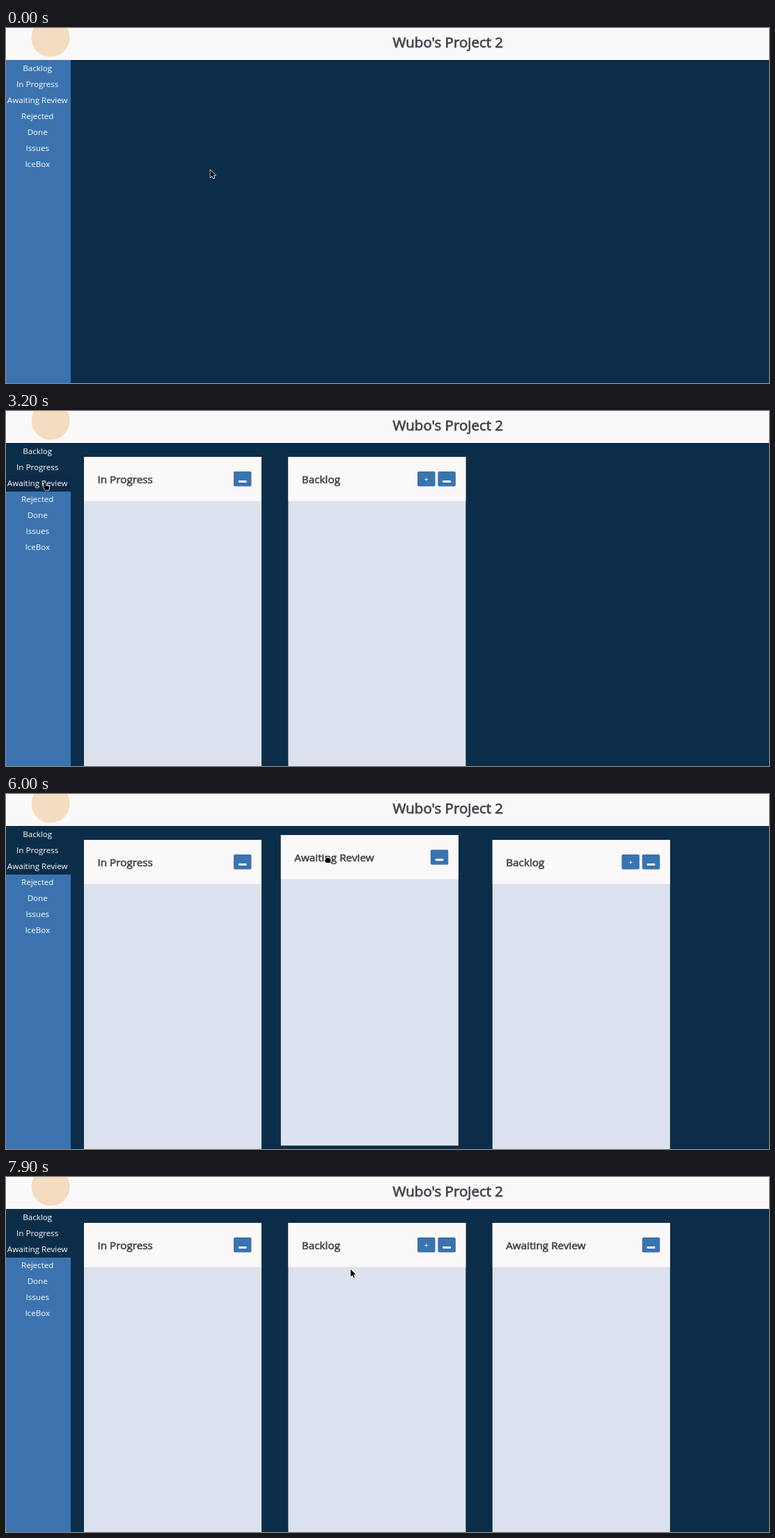
Write an HTML page that moves like this. It is 1096x511 px and loops after 8 s.

```html
<!DOCTYPE html>
<html lang="en">
<head>
<meta charset="utf-8">
<title>Project board</title>
<style>
  html, body { margin: 0; width: 100%; height: 100%; overflow: hidden; background: #0c2d4a; }
  svg { display: block; width: 100%; height: 100%; }
  text { font-family: "Open Sans", "Noto Sans", sans-serif; }
  .menu { font-size: 11.6px; fill: #fff; text-anchor: middle; }
  .title { font-size: 15.3px; fill: #3f444a; stroke: #3f444a; stroke-width: .6px; }
  .heading { font-size: 20.5px; fill: #43484e; stroke: #43484e; stroke-width: .8px; text-anchor: end; }
  .plus { font-size: 11.5px; fill: #fff; text-anchor: middle; }
</style>
</head>
<body>
<svg id="stage" viewBox="0 0 1096 511"></svg>
<script>
const LOOP = 8000, STEP = 100;
const BLUE = '#3b73af', NAVY = '#0c2d4a', HOVER = '#0c2845', PAPER = '#faf8f9';
const MENU = ['Backlog', 'In Progress', 'Awaiting Review', 'Rejected', 'Done', 'Issues', 'IceBox'];
const SIDE_TOP = 46, SIDE_WIDTH = 93, ROW_HEIGHT = 23;
const PANEL_TOP = 66, slotX = slot => 112 + 293.4 * slot;

// The dragged panel trails the pointer by this many ms.
const LAG = 40;
const DRAGS = [
  { name: 'Awaiting Review', start: 5115, end: 6100, from: slotX(0), to: 396, power: 3,
    grab: [62, 30], sway: e => 9.2 * Math.sin(4 * e) },
  { name: 'Backlog', start: 6900, end: 7900, from: slotX(2), to: 396, power: 1.7,
    grab: [51, 32], sway: e => -13 * Math.sin(Math.PI * e) ** 2 }
];
const MOVES = [
  { start: 0, end: 1000, to: [52, 54] },
  { start: 1700, end: 2400, to: [54, 80] },
  { start: 2700, end: 3200, to: [54, 103] },
  { start: 4000, end: 4800, to: [164, 94] },
  { start: 5100, end: 6000, to: [457, 88] },
  { start: 6000, end: 6400, to: [797, 96] },
  { start: 6400, end: 6700, to: [749, 98] },
  { start: 7800, end: 7900, to: [495, 133] }
];
const ORDERS = [
  [0, []],
  [1600, ['Backlog']],
  [2600, ['In Progress', 'Backlog']],
  [3800, ['Awaiting Review', 'In Progress', 'Backlog']],
  [5800, ['In Progress', 'Awaiting Review', 'Backlog']],
  [7300, ['In Progress', 'Backlog', 'Awaiting Review']]
];
const CURSORS = {
  arrow: 'M0 0V10.5L2.4 8.3L4.2 12L6 11.2L4.3 7.6H7.6Z',
  hand: 'M1.6 0Q2.8 0 2.8 1.2V4.2L7 5Q8.4 5.3 8.2 6.8L7.5 11H2.6L0 7.2Q-.6 6 .5 6V1.2Q.5 0 1.6 0Z',
  fist: 'M1 4Q4.5 1.5 7.2 4Q8.6 3.8 8.6 5.2V7.4L7.7 10H2.3L0 7.2Q-.4 6 1 6Z'
};

const stage = document.getElementById('stage');

function make(tag, attrs, parent = stage, text = '') {
  const el = document.createElementNS('http://www.w3.org/2000/svg', tag);
  for (const key in attrs) el.setAttribute(key, attrs[key]);
  el.textContent = text;
  return parent.appendChild(el);
}

const rect = (x, y, width, height, fill, parent, rx = 0) =>
  make('rect', { x, y, width, height, fill, rx }, parent);

const moveTo = (el, x, y) => el.setAttribute('transform', `translate(${x} ${y})`);

const mix = (a, b, k) => a + (b - a) * k;
const progress = ({ start, end }, t) => Math.min(1, Math.max(0, (t - start) / (end - start)));
const easeOut = p => 1 - (1 - p) ** 1.5;
const easeInOut = (p, power) =>
  p < .5 ? (2 * p) ** power / 2 : 1 - (2 - 2 * p) ** power / 2;

function dragPosition(drag, t) {
  const e = easeInOut(progress(drag, t), drag.power);
  return [mix(drag.from, drag.to, e), PANEL_TOP + drag.sway(e)];
}

function pointerPosition(drag, t) {
  if (drag) return dragPosition(drag, t + LAG).map((v, i) => v + drag.grab[i]);
  let at = [293.5, 204.5];
  for (const move of MOVES) {
    const e = easeOut(progress(move, t));
    at = at.map((v, i) => mix(v, move.to[i], e));
  }
  return at;
}

function makePanel(name) {
  const panel = make('g', {}, board);
  rect(0, 0, 255, 447, '#dbe2ed', panel);
  rect(0, 0, 255, 63.6, PAPER, panel);
  make('text', { x: 19.4, y: 37.8, class: 'title' }, panel, name);
  if (name === 'Backlog') {
    rect(185.6, 21, 25.5, 21.5, BLUE, panel, 2);
    make('text', { x: 198.4, y: 35.8, class: 'plus' }, panel, '+');
  }
  rect(215, 21, 25.5, 21.5, BLUE, panel, 2);
  rect(222, 34, 11.5, 3, '#fff', panel, .6);
  return panel;
}

rect(0, 0, 1096, 511, NAVY);
rect(0, 0, 1096, SIDE_TOP, PAPER);
make('circle', { cx: 64, cy: 14, r: 27.5, fill: '#f3dcc0' });
make('text', { x: 714, y: 28.3, class: 'heading' }, stage, "Wubo's Project 2");
rect(0, SIDE_TOP, SIDE_WIDTH, 465, BLUE);
const rows = MENU.map((label, i) => {
  const top = SIDE_TOP + i * ROW_HEIGHT;
  const row = rect(0, top, SIDE_WIDTH, ROW_HEIGHT + 1, NAVY);
  make('text', { x: 45.2, y: top + 16.3, class: 'menu' }, stage, label);
  return row;
});
const board = make('g', {});
const panels = {};
for (const name of MENU.slice(0, 3)) panels[name] = makePanel(name);
const cursor = make('path', {
  fill: '#000', stroke: '#fff', 'stroke-width': 1.4, 'stroke-linejoin': 'round', 'paint-order': 'stroke'
});

function draw(time) {
  const t = Math.floor(time % LOOP / STEP) * STEP;
  const order = ORDERS.filter(entry => entry[0] <= t).pop()[1];
  const drag = DRAGS.find(d => t > d.start && t < d.end);
  const [x, y] = pointerPosition(drag, t);
  const hovered = x < SIDE_WIDTH ? Math.floor((y - SIDE_TOP) / ROW_HEIGHT) : -1;

  rows.forEach((row, i) => {
    const shown = order.includes(MENU[i]);
    row.setAttribute('visibility', shown || i === hovered ? 'visible' : 'hidden');
    row.setAttribute('fill', shown ? NAVY : HOVER);
  });
  for (const name in panels) {
    const slot = order.indexOf(name);
    panels[name].setAttribute('visibility', slot < 0 ? 'hidden' : 'visible');
    moveTo(panels[name], slotX(slot), PANEL_TOP);
  }
  if (drag) {
    const panel = panels[drag.name];
    moveTo(panel, ...dragPosition(drag, t));
    if (board.lastChild !== panel) board.appendChild(panel);
  }
  cursor.setAttribute('d', CURSORS[drag ? 'fist' : hovered >= 0 ? 'hand' : 'arrow']);
  moveTo(cursor, x, y);
}

const began = performance.now();
function tick() {
  draw(performance.now() - began);
  requestAnimationFrame(tick);
}
tick();
</script>
</body>
</html>
```
